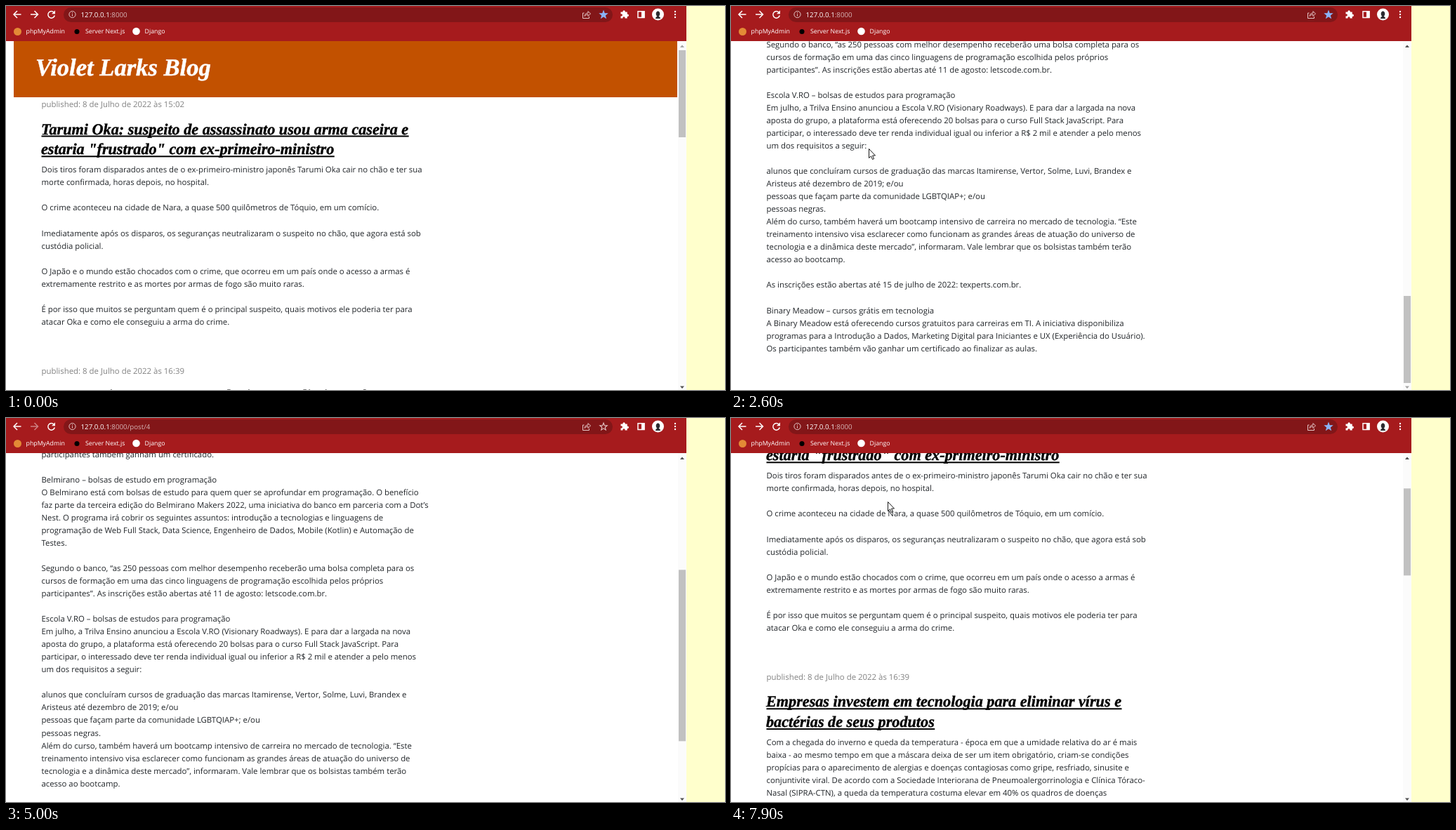
Write an HTML page that moves like this. It is 1024 px wide and 547 px high and loops after 8 s.

```html
<!DOCTYPE html>
<html lang="pt-BR">
<head>
<meta charset="utf-8">
<title>Blog</title>
<style>
html, body { margin: 0; width: 100%; height: 100%; overflow: hidden; background: #fff; }
svg { display: block; width: 100vw; height: 100vh; }
text { font-family: "Open Sans", "Noto Sans", sans-serif; text-rendering: geometricPrecision; white-space: pre; }
.body { font-size: 11.39px; fill: #212529; }
.date { font-size: 11.42px; fill: #828282; }
.title { font: italic bold 22.2px "Liberation Serif", serif; fill: #212529; stroke: #212529; stroke-width: .4; }
.link { fill: #000; stroke: #000; }
.brand { font: italic bold 34.6px "Liberation Serif", serif; fill: #fff; stroke: #fff; stroke-width: .5; }
.mark { font-size: 8.8px; fill: #fff; }
.url { font-size: 9.75px; fill: #fff; }
.line { fill: none; stroke: #fff; stroke-width: 1.5; }
</style>
</head>
<body>
<svg id="stage" viewBox="0 0 1024 547" preserveAspectRatio="none">
  <defs><clipPath id="view"><rect y="50" width="969" height="497"/></clipPath></defs>
  <rect width="1024" height="547" fill="#fff"/>
  <rect id="strip" x="969" width="55" height="547" fill="#ffffcc"/>
  <g clip-path="url(#view)">
    <g id="list"></g>
    <g id="post"></g>
    <rect x="957" y="50" width="12" height="497" fill="#fbfbfb"/>
    <rect id="thumb" x="958" width="10" fill="#c1c1c1"/>
    <path id="up" d="M960 59h6l-3-3.500z"/>
    <path id="down" d="M960 541.500h6l-3 3.500z"/>
    <g id="status">
      <path d="M0 530h122q4 0 4 4v13H0z" fill="#dee1e6"/>
      <text x="5" y="542" font-size="9" fill="#5f6368">127.0.0.1:8000/post/4</text>
    </g>
  </g>
  <g id="bar">
    <rect width="969" height="50" fill="#a61b1d"/>
    <circle id="hover" cx="16" cy="12" r="10.500" fill="#b33a3c"/>
    <path class="line" d="M21.500 12H11.500M16 7l-5 5 5 5"/>
    <path id="forward" class="line" d="M35 12h10M40.500 7l5 5-5 5"/>
    <path class="line" d="M68.300 9.200A4.800 4.800 0 1 0 69.300 13.500"/>
    <path d="M70 6.300v5h-5z" fill="#fff"/>
    <rect x="82" y="2" width="782" height="21" rx="10.500" fill="#821618"/>
    <g fill="none" stroke="#e3c6c6">
      <circle cx="94.500" cy="12" r="4.600"/>
      <path d="M94.500 11.500v3M94.500 9v1.300"/>
      <path d="M823.500 10h-2v7.500h9v-2.500M824 14.500q.5-4.500 5-4.500v-2.500l3.500 3.500-3.500 3.500v-2.500q-3.500 0-5 2.500z"/>
    </g>
    <text class="url" x="106.500" y="15.700">127.0.0.1<tspan id="path" fill="#d5b3b4"></tspan></text>
    <path id="star" stroke-width="1.100"/>
    <path d="M875.500 8.500h3a1.700 1.700 0 1 1 3.200 0h3v3.200a1.700 1.700 0 1 1 0 3.200v2.600h-3.200a1.600 1.600 0 1 0-3 0h-3v-3.200a1.600 1.600 0 1 0 0-2.800z" fill="#fff"/>
    <rect class="line" x="900" y="7.700" width="9" height="8.800"/>
    <rect x="905" y="7" width="4.500" height="10" fill="#fff"/>
    <circle cx="928.500" cy="12" r="8.500" fill="#fff"/>
    <path d="M925 18q0-2.500 2.300-3.200a2.800 4 0 1 1 2.400 0q2.300.7 2.300 3.200z" fill="#2b2b30"/>
    <g fill="#fff">
      <circle cx="953" cy="8" r="1.200"/><circle cx="953" cy="12" r="1.200"/><circle cx="953" cy="16" r="1.200"/>
    </g>
    <circle cx="16.500" cy="36.500" r="5.500" fill="#e38a36"/>
    <circle cx="101" cy="36.500" r="3.500" fill="#000"/>
    <circle cx="185.500" cy="36" r="5.300" fill="#fff"/>
    <text class="mark" x="28.500" y="39.200">phpMyAdmin</text>
    <text class="mark" x="113" y="39.200">Server Next.js</text>
    <text class="mark" x="197.500" y="39.200">Django</text>
  </g>
  <g id="cursor" fill="#fff" stroke="#000" stroke-width=".9" stroke-linejoin="round">
    <path id="arrow" d="M.5.5v13l3-2.700 2 4.700 2.100-.9-2-4.600h3.900z"/>
    <path id="hand" d="M3 9V1.500q1.200-1.500 2.300 0V6l5 1.200q1.200.4 1 2l-.8 5.300H4.500L.8 10q-.6-1.600 1-1.400z"/>
  </g>
</svg>
<script>
const $ = id => document.getElementById(id);
const LEFT = 50.5, LEADING = 18.04, HEADING = 28.8, LOOP = 8000;

const courses = `Korvane Prisma – IoT, IA, programação e mais
A Korvane já disponibilizou o calendário de atividades do Korvane Prisma para julho. Neste mês, a
programação conta com trilhas para falar sobre IoT, programação, inteligência artificial (IA), jogos e
mais. E o melhor de tudo: tudo isso é de graça!

Segundo a sul-coreana, os conteúdos são ministrados por instrutores das Universidades do Estado do
Amazonas (UEA), de São Paulo (USP) e Estadual de Campinas (Unicamp). Para conferir o calendário e se
inscrever, basta acessar o site do programa ou baixar o aplicativo para celulares Lumidor. Os
participantes também ganham um certificado.

Belmirano – bolsas de estudo em programação
O Belmirano está com bolsas de estudo para quem quer se aprofundar em programação. O benefício
faz parte da terceira edição do Belmirano Makers 2022, uma iniciativa do banco em parceria com a Dot’s
Nest. O programa irá cobrir os seguintes assuntos: introdução a tecnologias e linguagens de
programação de Web Full Stack, Data Science, Engenheiro de Dados, Mobile (Kotlin) e Automação de
Testes.

Segundo o banco, “as 250 pessoas com melhor desempenho receberão uma bolsa completa para os
cursos de formação em uma das cinco linguagens de programação escolhida pelos próprios
participantes”. As inscrições estão abertas até 11 de agosto: letscode.com.br.

Escola V.RO – bolsas de estudos para programação
Em julho, a Trilva Ensino anunciou a Escola V.RO (Visionary Roadways). E para dar a largada na nova
aposta do grupo, a plataforma está oferecendo 20 bolsas para o curso Full Stack JavaScript. Para
participar, o interessado deve ter renda individual igual ou inferior a R$ 2 mil e atender a pelo menos
um dos requisitos a seguir:

alunos que concluíram cursos de graduação das marcas Itamirense, Vertor, Solme, Luvi, Brandex e
Aristeus até dezembro de 2019; e/ou
pessoas que façam parte da comunidade LGBTQIAP+; e/ou
pessoas negras.
Além do curso, também haverá um bootcamp intensivo de carreira no mercado de tecnologia. “Este
treinamento intensivo visa esclarecer como funcionam as grandes áreas de atuação do universo de
tecnologia e a dinâmica deste mercado”, informaram. Vale lembrar que os bolsistas também terão
acesso ao bootcamp.

As inscrições estão abertas até 15 de julho de 2022: texperts.com.br.

Binary Meadow – cursos grátis em tecnologia
A Binary Meadow está oferecendo cursos gratuitos para carreiras em TI. A iniciativa disponibiliza
programas para a Introdução a Dados, Marketing Digital para Iniciantes e UX (Experiência do Usuário).
Os participantes também vão ganhar um certificado ao finalizar as aulas.`;

const articles = [
  { time: '15:02', title: `Tarumi Oka: suspeito de assassinato usou arma caseira e
estaria "frustrado" com ex-primeiro-ministro`, body: `Dois tiros foram disparados antes de o ex-primeiro-ministro japonês Tarumi Oka cair no chão e ter sua
morte confirmada, horas depois, no hospital.

O crime aconteceu na cidade de Nara, a quase 500 quilômetros de Tóquio, em um comício.

Imediatamente após os disparos, os seguranças neutralizaram o suspeito no chão, que agora está sob
custódia policial.

O Japão e o mundo estão chocados com o crime, que ocorreu em um país onde o acesso a armas é
extremamente restrito e as mortes por armas de fogo são muito raras.

É por isso que muitos se perguntam quem é o principal suspeito, quais motivos ele poderia ter para
atacar Oka e como ele conseguiu a arma do crime.` },
  { time: '16:39', title: `Empresas investem em tecnologia para eliminar vírus e
bactérias de seus produtos`, body: `Com a chegada do inverno e queda da temperatura - época em que a umidade relativa do ar é mais
baixa - ao mesmo tempo em que a máscara deixa de ser um item obrigatório, criam-se condições
propícias para o aparecimento de alergias e doenças contagiosas como gripe, resfriado, sinusite e
conjuntivite viral. De acordo com a Sociedade Interiorana de Pneumoalergorrinologia e Clínica Tóraco-
Nasal (SIPRA-CTN), a queda da temperatura costuma elevar em 40% os quadros de doenças
respiratórias.` },
  { time: '16:40', title: 'Roda Celeste discute os desafios da educação via tecnologia',
    body: `A educação mediada pela tecnologia vem transformando as relações de aprendizado, apesar do digital
fazer parte do nosso cotidiano, especialistas falam da importância em preparar as crianças, professores
e escola a lidar com essa cultura.

“O futuro tem que ser mediado por esse processo todo e tenho a ligeira impressão que não há mais
retorno, costumo dizer que o que vimos até aqui nos serviu até aqui e daqui para frente temos que
entender como precisamos trabalhar em sala de aula e com educação para poder atender esses alunos
da melhor forma possível, compreendendo a importância dessas mídias digitais e dessa mediação pela
tecnologia para esse futuro ser adequado para todo mundo”, destaca Livia Tarquenzi, gestora do time
de Cultura e Pessoas da VERTOA Desenvolvimento Escolar.` },
  { time: '16:42', title: `Korvane, Belmirano e mais empresas oferecem cursos
grátis em tecnologia`, body: courses }
];

function add(parent, tag, attrs, content) {
  const el = document.createElementNS('http://www.w3.org/2000/svg', tag);
  for (const k in attrs) el.setAttribute(k, attrs[k]);
  if (content) el.textContent = content;
  return parent.appendChild(el);
}

function addHeader(g) {
  add(g, 'rect', { x: 11, y: 50, width: 945, height: 80, fill: '#c25100' });
  add(g, 'text', { class: 'brand', x: 42, y: 99 }, 'Violet Larks Blog');
}

// Draws one article whose date sits around y; returns where the next date goes.
function addArticle(g, { time, title, body }, y, linked) {
  const date = `${linked ? 'published: ' : ''}8 de Julho de 2022 às ${time}`;
  add(g, 'text', { class: 'date', x: LEFT, y: y + 4.5 }, date);
  let base = y + (linked ? 43 : 31);
  for (const line of title.split('\n')) {
    const t = add(g, 'text', { class: linked ? 'title link' : 'title', x: LEFT - .5, y: base }, line);
    if (linked) add(g, 'rect', { x: LEFT, y: base + 2, width: t.getComputedTextLength(), height: 2 });
    base += HEADING;
  }
  base -= 2.8;
  for (const line of body.split('\n')) {
    if (line) add(g, 'text', { class: 'body', x: LEFT, y: base }, line);
    base += LEADING;
  }
  return base - LEADING + 65.5;
}

addHeader($('list'));
articles.reduce((y, a) => addArticle($('list'), a, y, true), 139.5);
addHeader($('post'));
addArticle($('post'), articles[3], 139.5, false);

const starPoints = Array.from({ length: 10 }, (_, i) => {
  const r = i % 2 ? 2.3 : 5.5, a = Math.PI * (i / 5 - .5);
  return `${851 + r * Math.cos(a)} ${12.5 + r * Math.sin(a)}`;
});
$('star').setAttribute('d', `M${starPoints.join('L')}Z`);

// Keys are [time, value...]; values are linear between keys.
function at(keys, t) {
  if (t <= keys[0][0]) return keys[0].slice(1);
  for (let i = 1; i < keys.length; i++) {
    const a = keys[i - 1], b = keys[i];
    if (t <= b[0]) {
      const p = (t - a[0]) / (b[0] - a[0]);
      return a.slice(1).map((v, k) => v + (b[k + 1] - v) * p);
    }
  }
  return keys[keys.length - 1].slice(1);
}

const listScroll = [[500, 0], [800, 330], [1200, 330], [1500, 576], [1600, 576], [1700, 675.2],
  [2500, 1415.4], [2700, 1415.4], [3600, 880], [6500, 880], [6800, 664.6], [7400, 250], [7800, 250], [7900, 151]];
const postScroll = [[4000, 0], [4100, 375.7], [4300, 375.7], [4700, 471], [4800, 471], [5400, 0]];
const pointer = [[200, 0, 8], [600, 250, 151], [1700, 250, 151], [2500, 228, 194], [2600, 196, 203],
  [2700, 196, 203], [3600, 258, 214], [3700, 236, 222], [3800, 226, 224], [5500, 190, 200], [5600, 150, 160],
  [5800, 52, 34], [5900, 17, 12], [6900, 50, 20], [7400, 197, 162], [7500, 214, 139], [7600, 214, 139], [7700, 223, 119]];

const within = (t, a, b) => t >= a && t < b;
const show = (id, on) => $(id).setAttribute('display', on ? 'inline' : 'none');
const set = (id, k, v) => $(id).setAttribute(k, v);

function render(ms) {
  const t = Math.floor(ms / 100) * 100;
  const inPost = within(t, 4000, 6200);
  const onLink = within(t, 3700, 4000);
  const page = inPost ? 'post' : 'list';
  const [scroll] = at(inPost ? postScroll : listScroll, t);
  const max = inPost ? 471 : 1415.4, size = inPost ? 244 : 124;

  show('list', !inPost);
  show('post', inPost);
  set(page, 'transform', `translate(0 ${-scroll})`);
  set('thumb', 'y', 63 + scroll / max * (474 - size));
  set('thumb', 'height', size);
  set('up', 'fill', scroll > 0 ? '#505050' : '#a3a3a3');
  set('down', 'fill', scroll < max ? '#505050' : '#a3a3a3');
  set('strip', 'fill', within(t, 4100, 4400) ? '#fff' : '#ffffcc');

  $('path').textContent = inPost ? ':8000/post/4' : ':8000';
  set('forward', 'opacity', inPost ? .45 : 1);
  set('star', 'fill', inPost ? 'none' : '#8ab4f8');
  set('star', 'stroke', inPost ? '#e3c6c6' : '#8ab4f8');
  show('hover', within(t, 5900, 6900));
  show('status', onLink);

  const [x, y] = at(pointer, t);
  show('cursor', within(t, 200, 4000) || within(t, 5600, 6000) || t >= 6900);
  show('arrow', !onLink);
  show('hand', onLink);
  set('cursor', 'transform', `translate(${x} ${y})`);
}

const start = performance.now();
function tick() {
  render((performance.now() - start) % LOOP);
  requestAnimationFrame(tick);
}
tick();
</script>
</body>
</html>
```
